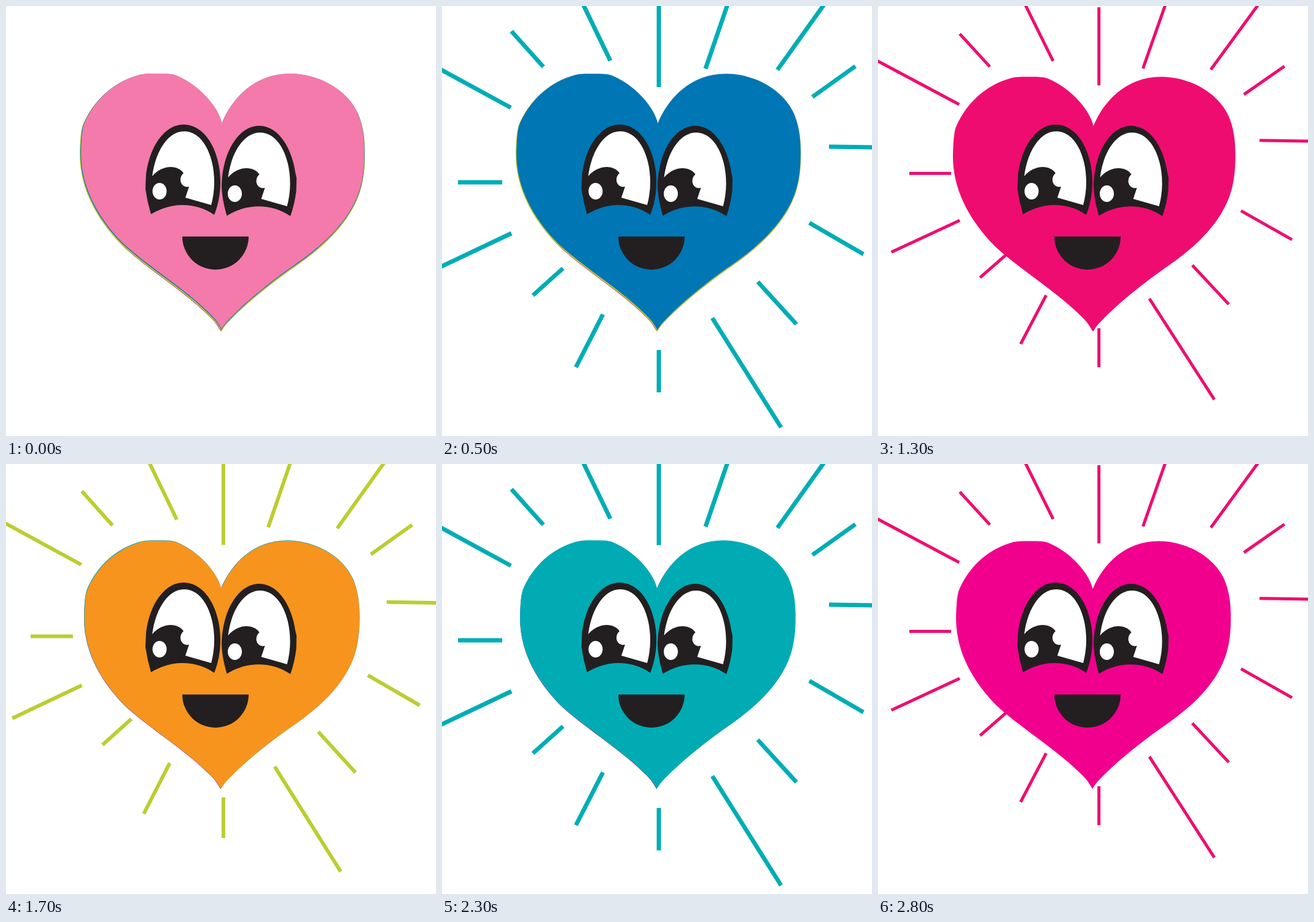
Recreate the animation shown at these times as an HTML page. Size 700 by 700 pixels, loop 3100 ms.

```html
<!DOCTYPE html>
<html lang="en">
<head>
<meta charset="utf-8">
<title>Beaming heart</title>
<style>
  html, body { margin: 0; width: 100%; height: 100%; overflow: hidden; background: #fff; }
  svg { display: block; width: 100%; height: 100%; }
</style>
</head>
<body>
<svg viewBox="0 0 700 700">
  <defs>
    <path id="heart" d="M350.5 192C346 168 315 130 276 114C268 111 258 111 243 111C227 111 220 111 209 115
      C165 129 137 163 124 195C121 205 120 220 119.5 240C119 300 150 350 187 388C225 424 290 464 330 504
      C340 513 345 521 350 530C356 519 364 512 375 501C400 477 430 453 462 430C500 404 535 377 560 337
      C578 308 584 280 584 240C584 215 581 195 573 176C555 136 507 111 462 111C405 111 368 150 350.5 192Z"/>
  </defs>
  <path id="rays" vector-effect="non-scaling-stroke" d="M353 132V-6M429 102l45-131M546 104l95-133M603 148l70-50
    M630 229l150 2M598 353l88 51M514 449l63 69M440 508l112 178M353 560v69M262 502l-44 86M197 427l-49 44
    M113 370l-118 56M98 287H26M112 165.500l-156-85M165 99l-52-58M274 89l-57-118"/>
  <g id="hearts"></g>
  <g fill="#231f20">
    <path d="M236 339Q230 319 227 298L228 274C234 227 259 193 289 193C325 193 349 237 349 287
      C349 307 345 325 339 340C310 320 270 318 236 339Z"/>
    <path d="M359.500 341.500C354 322 351 306 351 290C353 237 379 195 412 195C443 195 465 230 471 271
      L473 280L472.500 301Q470 322 463 342C434 322 393 320 359.500 341.500Z"/>
    <path d="M287 375.200H395A54 54 0 0 1 287 375.200Z"/>
  </g>
  <g fill="#fff">
    <path id="white" d="M238 277C244 232 266 204 290 204C320 204 339 243 339 287C339 300 337 313 334 324
      L292 312L298 294C290 296 284 290 284 283C284 278 286 275 289 272C280 259 256 257 238 277Z"/>
    <use href="#white" x="123.500" y="2"/>
    <ellipse cx="250" cy="301.500" rx="11.500" ry="13.500"/>
    <ellipse cx="372.500" cy="305.500" rx="11.500" ry="13.500"/>
  </g>
</svg>
<script>
const LOOP = 3100;
const SVG = 'http://www.w3.org/2000/svg';
const rays = document.getElementById('rays');
const stack = document.getElementById('hearts');

// Top heart first: colour, size, height of the lower tip
const hearts = [
  ['#f47aab', .993, 526],
  ['#0076b4', .996, 527.6],
  ['#bccd31', 1, 530],
  ['#ef0c70', .99, 530],
  ['#f7941e', .964, 529],
  ['#00abb4', .966, 529],
  ['#f01e25', .961, 528.5],
  ['#f1008e', .963, 529]
];

// Colour, line width, placement
const bursts = [
  ['#ffde00', 6, 'translate(19 .8) scale(.9175 .99)'],
  ['#00adb5', 7, ''],
  ['#7156a5', 11, 'translate(.5 .6) scale(.9925 .994)'],
  ['#ee0e70', 5, 'translate(26.4 7.5) scale(.944 .923)'],
  ['#bccd31', 6, 'translate(15 5) scale(.96)']
];

// Each heart is scaled about its tip; the tips drift left through the stack
const layers = hearts.map(([fill, size, tip], i) => {
  const node = document.createElementNS(SVG, 'use');
  node.setAttribute('href', '#heart');
  node.setAttribute('fill', fill);
  node.setAttribute('transform', `translate(${351 - .28 * i} ${tip}) scale(${size}) translate(-350 -530)`);
  stack.prepend(node);
  return node;
});

// A beat lasts 200 ms, the first is half as long, and the ending is hurried
function beatAt(t) {
  if (t >= 2800) return 16;
  if (t >= 2600) return 14;
  return Math.floor((t + 100) / 200);
}

// Rays change on even beats and hearts on odd ones
function draw(t) {
  const beat = beatAt(t);
  const top = Math.max(0, Math.floor((beat - 1) / 2));
  const [color, width, place] = bursts[Math.floor(beat / 2) % bursts.length];
  layers.forEach((node, i) => node.setAttribute('visibility', i < top ? 'hidden' : 'visible'));
  rays.setAttribute('visibility', beat ? 'visible' : 'hidden');
  rays.setAttribute('stroke', color);
  rays.setAttribute('stroke-width', width);
  rays.setAttribute('transform', place);
}

const start = performance.now();
function tick() {
  draw((performance.now() - start) % LOOP);
  requestAnimationFrame(tick);
}
tick();
</script>
</body>
</html>
```
